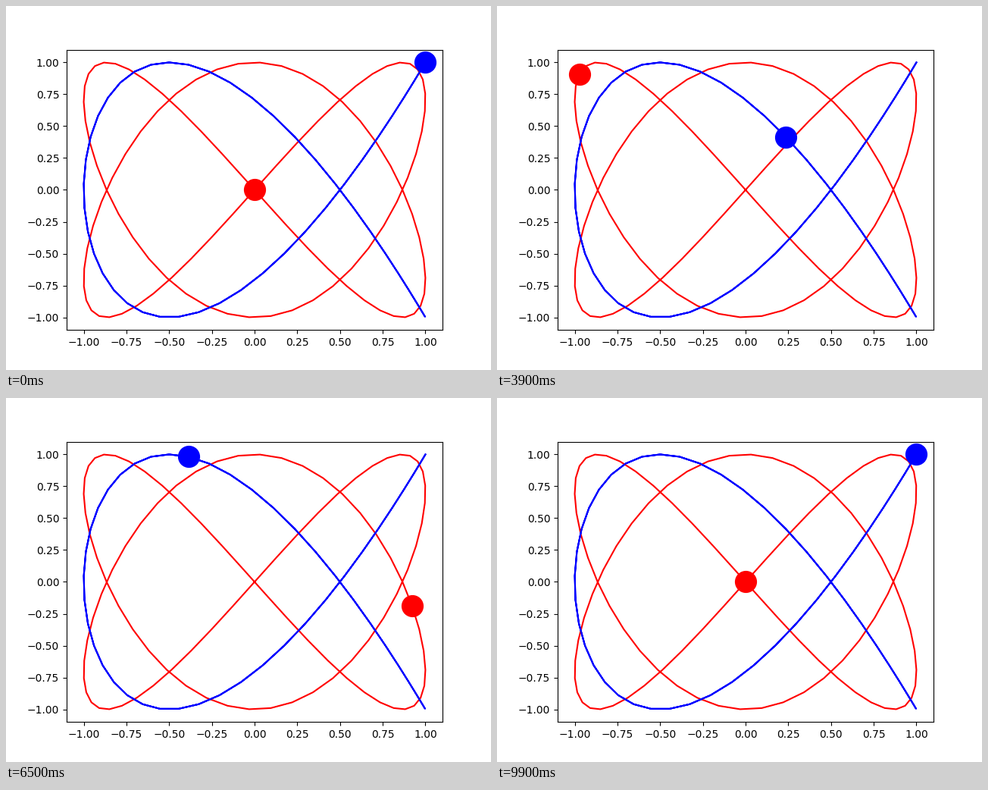
Recreate the animation shown at these times as a matplotlib script. Size 640 by 480 pixels, loop 10 s.

```python
import numpy as np
import matplotlib.pyplot as plt
from matplotlib.animation import FuncAnimation

FRAMES = 100
INTERVAL = 100  # ms

t = np.linspace(0, 2 * np.pi, FRAMES)
curves = [
    (np.sin(2 * t), np.sin(3 * t), "red"),
    (np.cos(2 * t), np.cos(3 * t), "blue"),
]

fig, ax = plt.subplots(figsize=(6.4, 4.8), dpi=100)
for x, y, color in curves:
    ax.plot(x, y, color=color)
dots = [
    ax.plot(x[:1], y[:1], "o", color=color, markersize=20)[0]
    for x, y, color in curves
]


def update(i):
    for dot, (x, y, _) in zip(dots, curves):
        dot.set_data([x[i]], [y[i]])
    return dots


anim = FuncAnimation(fig, update, frames=FRAMES, interval=INTERVAL,
                     repeat=True, repeat_delay=0)
plt.show()
```
